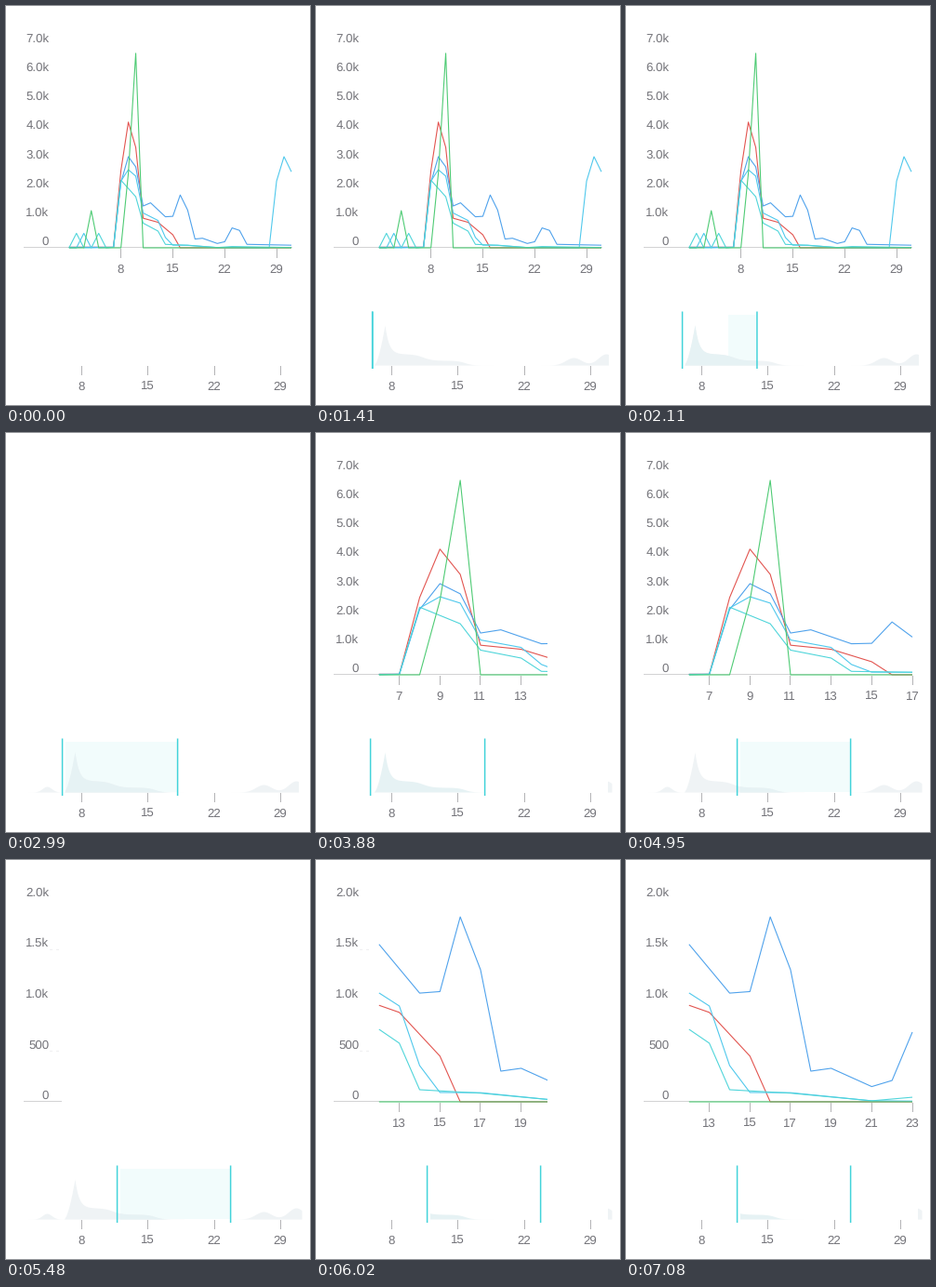
Write a matplotlib script that moves like this. It is 327 px wide and 429 px high and loops after 7180 ms.

```python
import math

import matplotlib.pyplot as plt
import numpy as np
from matplotlib.animation import FuncAnimation
from matplotlib.patches import Rectangle
from matplotlib.transforms import Bbox

W, H, DPI = 327, 429, 64
PX = 72 / DPI               # points per pixel
LOOP, TICK, STEP = 7180, 20, 177
BASE, TOP = 260, 41.5       # value axis, zero and maximum
LEFT, RIGHT = 67.8, 308     # plot area
MINI_BASE = 386

INK, AXIS, TICK_GREY = "#737379", "#d2d2d4", "#b4b4b6"
HANDLE = "#41d3da"

# colour and (day, value) corners, joined by straight lines
SERIES = [
    ("#e2544f", [(7, 20), (8, 2660), (9, 4330), (10, 3460), (11, 1020),
                 (13, 880), (15, 450), (16, 0)]),
    ("#4fa2ec", [(7, 20), (8, 2250), (9, 3140), (10, 2790), (11, 1440),
                 (12, 1550), (14, 1070), (15, 1085), (16, 1820), (17, 1300),
                 (18, 302), (19, 330), (21, 150), (22, 210), (23, 686),
                 (24, 600), (25, 120), (31, 90)]),
    ("#4fc8ec", [(2, 0), (3, 500), (4, 0), (7, 20), (8, 2300), (9, 2690),
                 (10, 2470), (11, 1200), (13, 943), (14, 357), (15, 92),
                 (17, 90), (21, 10), (28, 0), (29, 2300), (30, 3140),
                 (31, 2620)]),
    ("#4fd5da", [(1, 0), (2, 500), (3, 0), (4, 0), (5, 500), (6, 0), (7, 20),
                 (8, 2330), (10, 1760), (11, 850), (13, 577), (14, 119),
                 (17, 85), (21, 10), (23, 45), (31, 10)]),
    ("#4ecb74", [(3, 0), (4, 1280), (5, 0), (8, 0), (9, 2560), (10, 6700),
                 (11, 0)]),
]

plt.rcParams["text.hinting"] = "none"
fig = plt.figure(figsize=(W / DPI, H / DPI), dpi=DPI, facecolor="white")
ax = fig.add_axes([0, 0, 1, 1])
ax.set_xlim(0, W)
ax.set_ylim(H, 0)
ax.axis("off")


def line(xs, ys, color, width=1, z=2):
    return ax.plot(xs, ys, color=color, lw=width * PX, zorder=z, snap=False,
                   solid_capstyle="butt", solid_joinstyle="round")[0]


def label(x, y, text, align):
    return ax.text(x, y, text, ha=align, va="baseline", color=INK,
                   family="Liberation Sans", size=13.2 * PX, clip_on=True)


def tick(x, y, day):
    """A tick on whole pixels with its day below."""
    x = math.floor(x) + 0.5
    return [line([x, x], [y, y + 10], TICK_GREY, z=1),
            label(x - 0.3, y + 25.7, str(day), "center")]


def clip(artist, x0, x1):
    """Show only the part of the artist between two stage columns."""
    artist.set_visible(x1 > x0)
    artist.set_clip_box(Bbox.from_extents(x0, 0, x1, H))


def make_chart(first, last, ticks, top, labels, right=RIGHT):
    """Build one state of the main chart and return its artists."""
    def day_x(day):
        return LEFT + (right - LEFT) * (day - first) / (last - first)

    parts = [line([19, RIGHT], [259.5, 259.5], AXIS, z=1)]
    for i, text in enumerate(labels):
        y = BASE - (BASE - TOP) * i / (len(labels) - 1)
        parts.append(label(46.3, y - 2.8, text, "right"))
    for day in ticks:
        parts += tick(day_x(day), 261, day)
    days = np.arange(first, last + 1)
    for z, (color, corners) in enumerate(SERIES):
        values = np.interp(days, *zip(*corners))
        ys = BASE - values * (BASE - TOP) / top
        parts.append(line(day_x(days), ys, color, 1.1, 3 + z))
    return parts


thousands = ["0"] + [f"{n}.0k" for n in range(1, 8)]
month = make_chart(1, 31, range(8, 30, 7), 7000, thousands, right=307)
early = make_chart(6, 17, range(7, 18, 2), 7000, thousands)
middle = make_chart(12, 23, range(13, 24, 2), 2000,
                    ["0", "500", "1.0k", "1.5k", "2.0k"])

grid = [line([x, x + 3], [y, y], "#efeff1")
        for y in (96.5, 205.5) for x in (47, 54)]

for day in range(8, 30, 7):
    tick(81.5 + 71.3 * (day - 8) / 7, 387, day)


def hump(x, mid, width):
    return np.exp(-((x - mid) / width) ** 2)


def fall(x, mid, width):
    return 1 / (1 + np.exp((x - mid) / width))


def mini_height(x):
    """Overview silhouette: a sharp spike, two shoulders, three low humps."""
    rise = 43 * (np.clip(x - 62, 0, 12) / 12) ** 1.6
    decay = (31 * np.exp(-np.maximum(x - 74, 0) / 4.2)
             + 7 * fall(x, 115, 5) + 5 * fall(x, 160, 4))
    humps = 6 * hump(x, 44, 7) + 8 * hump(x, 277, 12) + 12 * hump(x, 312, 12)
    return np.where(x < 74, rise, decay) + humps


def mini_area(color, z):
    xs = np.arange(22, 318.5, 0.5)
    return ax.fill_between(xs, MINI_BASE - mini_height(xs), MINI_BASE,
                           color=color, lw=0, zorder=z)


back_area = mini_area("#eff3f5", 1.2)
pick_area = mini_area("#e6f2f4", 1.4)
pick_fill = ax.add_patch(Rectangle((0, 332), 1, 54, color="#f2fcfc", lw=0,
                                   zorder=1.1))
handles = [line([0, 0], [328.5, 390], HANDLE, 1.5, 9) for _ in range(2)]


def ease(p):
    p = min(max(p, 0), 1)
    return p * p * (3 - 2 * p)


def brush(k):
    """Columns of the two handles."""
    if k < 19:
        return 60, 60 + 124 * ease((k - 7.8) / 7)
    p = ease((k - 23.95) / 4)
    return 58 + 61 * p, 181 + 60 * p


def reveal(k, start):
    """Right edge of a chart being wiped in."""
    p = min(max((k - start) * 0.1312, 0), 1)
    return W * (1 - math.cos(math.pi * p)) / 2


def draw_brush(k):
    shown = k >= 8
    busy = 8 <= k <= 19 or 27 <= k <= 31
    left, right = brush(k)
    for handle, x in zip(handles, (left, right)):
        handle.set_visible(shown)
        handle.set_xdata([x + 0.6, x + 0.6])

    if busy:
        clip(back_area, 62 if k < 16 else 22, 314 if k < 20 else 318)
    else:
        clip(back_area, 314, 318 if k >= 20 else 0)

    inner = left + 3.5
    clip(pick_area, inner, right if shown else 0)
    # while the brush opens, only its newest stretch is tinted
    start = max(inner, right - 30) if k < 15 else inner
    pick_fill.set_visible(busy and right > start)
    pick_fill.set_x(start)
    pick_fill.set_width(max(right - start, 0))


def draw(i):
    k = (i * TICK + 30) // STEP     # the picture changes once per STEP
    edges = ((month, W if k < 17 else 0),
             (early, reveal(k, 16.855) if 17 <= k < 29 else 0),
             (middle, reveal(k, 28.855) if k >= 29 else 0))
    for chart, edge in edges:
        for part in chart:
            clip(part, 0, edge)
    for dash in grid:
        dash.set_visible(31 <= k < 37)
    draw_brush(k)
    return []


anim = FuncAnimation(fig, draw, frames=LOOP // TICK, interval=TICK,
                     repeat=True, repeat_delay=0, blit=False)
plt.show()
```
